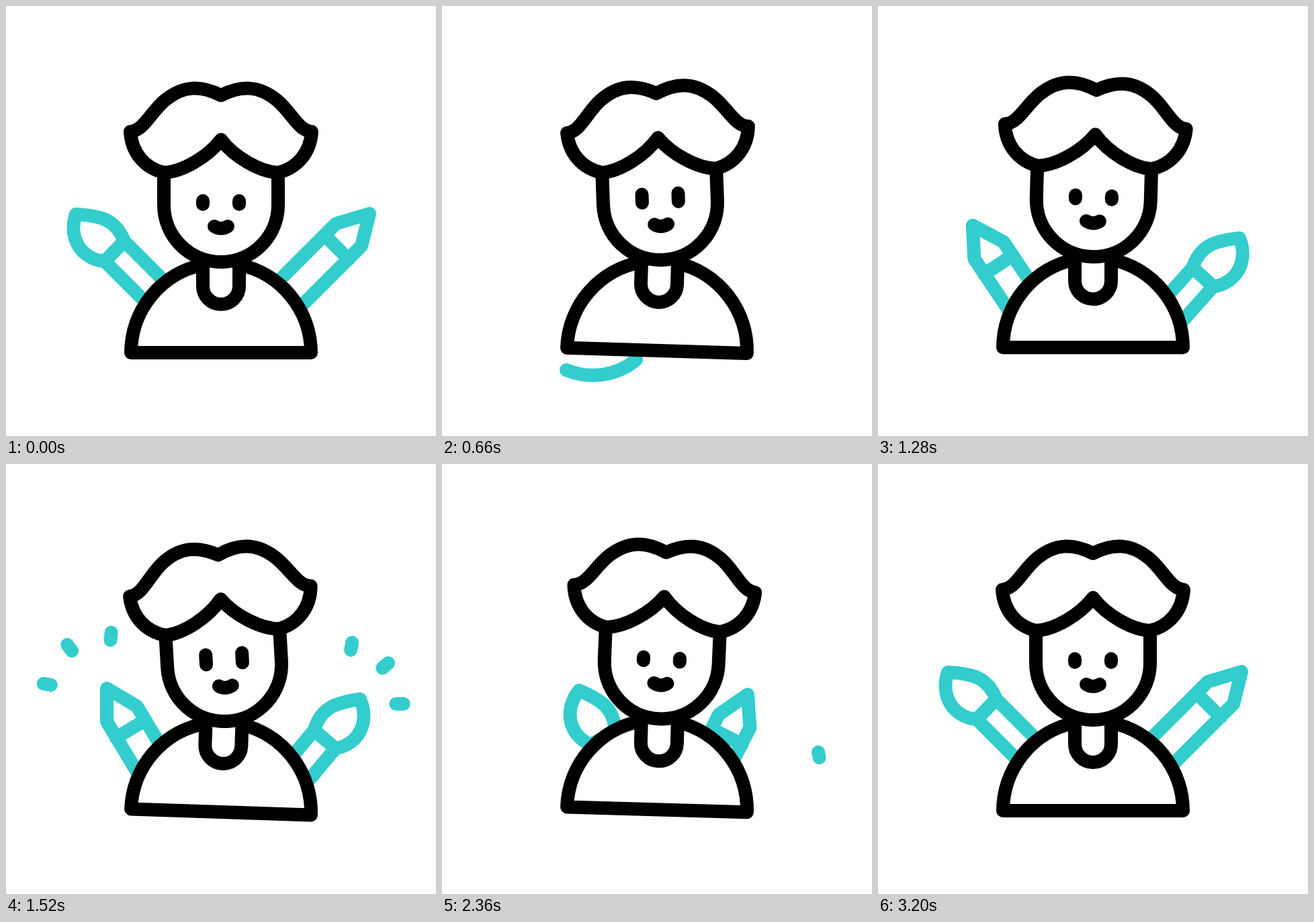
Recreate the animation shown at these times as an HTML page with a canvas. Size 640x640 px, loop 3360 ms.

```html
<!DOCTYPE html>
<html>
<head>
<meta charset="utf-8">
<style>
html, body { margin: 0; height: 100%; overflow: hidden; background: #fff; }
canvas { display: block; width: 100vw; height: 100vh; }
</style>
</head>
<body>
<canvas id="stage" width="640" height="640"></canvas>
<script>
const ctx = document.getElementById('stage').getContext('2d');
const LOOP = 3360, TEAL = '#33cdcd', BLACK = '#000';

const body = new Path2D('M293 385A134 134 0 0 0 186 516H454A134 134 0 0 0 347 385');
const collar = new Path2D('M293 386V417A27 27 0 0 0 347 417V386');
const face = new Path2D('M235 245V296A85 85 0 0 0 405 296V245');
const hair = new Path2D('M320 133C290 118 264 118 237 140C215 158 205 186 185 187' +
  'C187 218 206 241 235 248C262 247 300 225 320 199C340 225 378 247 405 248' +
  'C434 241 453 218 455 187C435 186 425 158 403 140C376 118 350 118 320 133Z');
const mouth = new Path2D('M310 328Q320 334 330 328');
const brush = {
  tip: [104, 310],
  path: new Path2D('M104 310C140 312 163 317 176 350L147 380C112 377 92 345 104 310Z' +
    'M176 350l80 80M147 380l80 80')
};
const pencil = {
  tip: [541, 309],
  path: new Path2D('M400 415L491 324L541 309L529 357L438 448M474 341L510 377')
};
const swipes = [
  { d: 'M318 490C290 545 230 565 174 537C120 510 92 470 91 430', head: [510, 810], tail: [590, 880] },
  { d: 'M322 490C350 560 420 575 480 542C535 512 571 470 560 429', head: [1990, 2290], tail: [2080, 2390] }
].map(s => {
  const el = document.createElementNS('http://www.w3.org/2000/svg', 'path');
  el.setAttribute('d', s.d);
  return { ...s, path: new Path2D(s.d), length: el.getTotalLength() };
});

// Keys are [time, ...values]
const bob = [[190, 0], [370, -13], [560, 6], [760, -12], [1020, 6], [1210, -12], [1450, 8],
  [1650, -13], [1880, 4.5], [2090, -12], [2290, 0], [2420, -3], [2640, 0]];
const sway = [[190, 0], [650, 1.75], [1070, -2], [1490, 2], [1880, -2], [2320, 1.7], [2800, 0]];
const tilt = [[190, 0], [680, -2.1], [1130, 3], [1690, -5], [2200, 3], [2760, 0]];
const eyeLift = [[420, 0], [650, 7.5], [880, 0], [1280, 0], [1520, 9.5], [1960, 0]];

// Tool keys are [time, tip x, tip y, turn]; swapped tools use mirrored positions
const brushKeys = [[190, 104, 310, 0], [520, 280, 450, 30]];
const pencilKeys = [[190, 541, 309, 0], [520, 362, 450, -30]];
const brushSwapped = [[860, 280, 450, 30], [990, 190, 380, 23], [1040, 148, 354, 18],
  [1230, 101, 345, 3], [1520, 113, 350, 5], [1780, 280, 450, 30]];
const pencilSwapped = [[860, 362, 450, -30], [990, 445, 385, -20], [1040, 475, 360, -16],
  [1230, 500, 326, -11], [1520, 490, 334, -14], [1780, 362, 450, -30]];
const brushBack = [[2200, 280, 450, 30], [2360, 204, 337, 20], [2720, 104, 310, 0]];
const pencilBack = [[2200, 362, 450, -30], [2360, 455, 343, -18], [2720, 541, 309, 0]];

const smooth = x => { x = Math.min(1, Math.max(0, x)); return x * x * (3 - 2 * x); };
const rad = deg => deg * Math.PI / 180;

function at(keys, t) {
  let i = 1;
  while (i < keys.length - 1 && t > keys[i][0]) i++;
  const a = keys[i - 1], b = keys[i], u = smooth((t - a[0]) / (b[0] - a[0]));
  return a.slice(1).map((v, k) => v + (b[k + 1] - v) * u);
}

function turn(deg, x, y) {
  ctx.translate(x, y);
  ctx.rotate(rad(deg));
  ctx.translate(-x, -y);
}

function shape(path, filled) {
  if (filled) ctx.fill(path);
  ctx.stroke(path);
}

function line(x1, y1, x2, y2) {
  ctx.beginPath();
  ctx.moveTo(x1, y1);
  ctx.lineTo(x2, y2);
  ctx.stroke();
}

function tool({ tip, path }, keys, t, mirrored) {
  const [x, y, deg] = at(keys, t);
  ctx.save();
  ctx.beginPath();
  ctx.rect(0, 0, 640, 502);
  ctx.clip();
  if (mirrored) { ctx.translate(640, 0); ctx.scale(-1, 1); }
  ctx.translate(x, y);
  ctx.rotate(rad(deg));
  ctx.translate(-tip[0], -tip[1]);
  ctx.stroke(path);
  ctx.restore();
}

function tools(t) {
  const swapped = t > 700 && t < 1990, back = t >= 1990;
  tool(brush, swapped ? brushSwapped : back ? brushBack : brushKeys, t, swapped);
  tool(pencil, swapped ? pencilSwapped : back ? pencilBack : pencilKeys, t, swapped);
}

function swipe(s, t) {
  const part = ([a, b]) => smooth((t - a) / (b - a)) * s.length;
  const from = part(s.tail), to = part(s.head);
  if (to - from < 0.1) return;
  ctx.setLineDash([to - from, s.length * 2]);
  ctx.lineDashOffset = -from;
  ctx.stroke(s.path);
  ctx.setLineDash([]);
}

function burst(t, start, x, y, angles) {
  const u = (t - start) / 380;
  if (u <= 0 || u >= 1) return;
  const outer = 30 + 66 * (1 - (1 - u) ** 4), inner = 30 + 66 * (1 - (1 - u) ** 2);
  for (const deg of angles) {
    const c = Math.cos(rad(deg)), s = Math.sin(rad(deg));
    line(x + c * inner, y + s * inner, x + c * outer, y + s * outer);
  }
}

function person(t) {
  const [lift] = at(bob, t), [lean] = at(sway, t), [nod] = at(tilt, t), [eye] = at(eyeLift, t);
  ctx.save();
  ctx.translate(0, lift);
  turn(lean, 320, 516);
  shape(body, true);
  shape(collar, true);
  turn(nod - lean, 320, 322);
  shape(face, true);
  shape(hair, true);
  for (const x of [293, 347]) line(x, 290 - eye, x, 295);
  shape(mouth);
  ctx.restore();
}

function draw(now) {
  const t = now % LOOP;
  ctx.fillStyle = '#fff';
  ctx.fillRect(0, 0, 640, 640);
  ctx.lineWidth = 20;
  ctx.lineCap = ctx.lineJoin = 'round';
  ctx.strokeStyle = TEAL;
  tools(t);
  swipes.forEach(s => swipe(s, t));
  burst(t, 1320, 147, 343, [-84, -127, -170]);
  burst(t, 1320, 499, 357, [-80, -41, 0]);
  burst(t, 2815, 141, 326, [-95, -135, -175]);
  burst(t, 2815, 522, 326, [-85, -45, -5]);
  ctx.strokeStyle = BLACK;
  person(t);
}

const begin = performance.now();
function frame() {
  draw(performance.now() - begin);
  requestAnimationFrame(frame);
}
frame();
</script>
</body>
</html>
```
